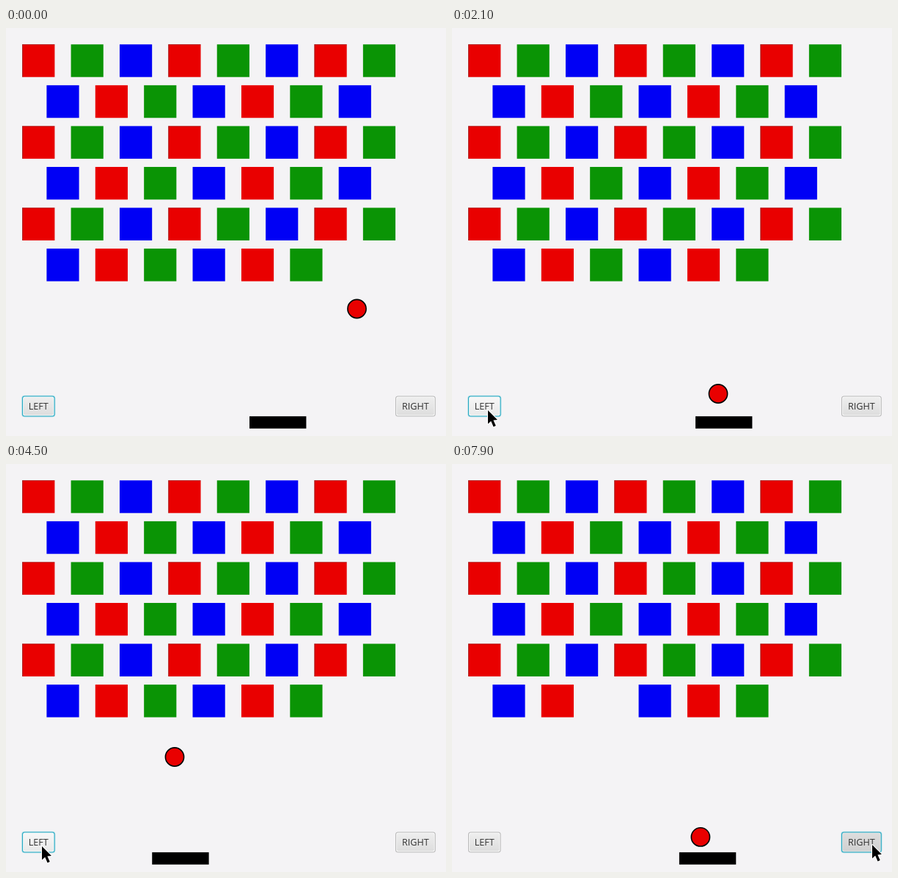
An HTML page with a canvas that plays this animation: 600x555 px, repeating every 8 s.

```html
<!DOCTYPE html>
<html lang="en">
<head>
<meta charset="utf-8">
<title>Brick game</title>
<style>
  html, body { margin: 0; width: 100%; height: 100%; overflow: hidden; background: #f4f3f5; }
  canvas { display: block; }
</style>
</head>
<body>
<canvas id="stage" width="600" height="555"></canvas>
<script>
const ctx = document.getElementById('stage').getContext('2d');
const LOOP = 8000, TICK = 100;
const COLORS = ['#e90000', '#0a9405', '#0000f5'];

// Distance travelled by the ball, and the two bounces along its way
const TRAVEL = [[0, 0], [1400, 76], [2800, 155], [4500, 248.5], [5700, 315.8], [6900, 382.5], [7900, 438.4]];
const START = { x: 478.5, y: 382 };
const PADDLE_HIT = 132.5, BRICK_HIT = 289;

const LEFT_CLICKS = [2600, 2900, 3200, 3500, 3800, 4100];
const RIGHT_CLICKS = [7050, 7230, 7410, 7590, 7770, 7950];
const PADDLE_STEP = 22.13;

// time, x, y of the pointer tip
const POINTER = [
  [1000, 108, 502], [1400, 82, 510], [1900, 49, 520], [5750, 49, 520],
  [6250, 130, 555], [6400, 470, 555], [6650, 583, 522], [6800, 573, 518], [8000, 573, 518]
];

function track(keys, t, col = 1) {
  if (t <= keys[0][0]) return keys[0][col];
  for (let i = 1; i < keys.length; i++) {
    const a = keys[i - 1], b = keys[i];
    if (t <= b[0]) return a[col] + (b[col] - a[col]) * (t - a[0]) / (b[0] - a[0]);
  }
  return keys[keys.length - 1][col];
}

const clicksBy = (list, t) => list.filter(c => c <= t).length;
const isDown = (list, t) => list.some(c => t >= c - 130 && t < c);

function drawBricks(hit) {
  let n = 0;
  for (let row = 0; row < 6; row++) {
    const odd = row % 2;
    for (let col = 0; col < 8 - odd; col++, n++) {
      if (row === 5 && (col === 6 || (col === 2 && hit))) continue;
      const x = 22.2 + odd * 33.2 + col * 66.38, y = 22.3 + row * 55.56;
      ctx.fillStyle = COLORS[n % 3];
      ctx.fillRect(x, y, 44.2, 44.4);
      if (!odd && n % 3 === 0) {
        ctx.fillStyle = 'rgba(60,0,0,.4)';
        ctx.fillRect(x, y, 1, 44.4);
        ctx.fillRect(x, y, 44.2, 0.8);
      }
    }
  }
}

function drawBall(d) {
  const x = d < BRICK_HIT ? START.x - d : START.x - 2 * BRICK_HIT + d;
  let y = START.y + d;
  if (d > PADDLE_HIT) y = START.y + 2 * PADDLE_HIT - d;
  if (d > BRICK_HIT) y = START.y + 2 * PADDLE_HIT - 2 * BRICK_HIT + d;
  ctx.beginPath();
  ctx.arc(x, y, 12.6, 0, Math.PI * 2);
  ctx.fillStyle = '#e90000';
  ctx.fill();
  ctx.lineWidth = 1.6;
  ctx.strokeStyle = '#000';
  ctx.stroke();
}

function box(x, y, w, h, r, fill) {
  ctx.beginPath();
  ctx.roundRect(x, y, w, h, r);
  ctx.fillStyle = fill;
  ctx.fill();
}

function drawButton(label, x, w, { focus, hover, down }) {
  const y = 500.5, h = 28;
  const [top, bottom] = down ? ['#dedede', '#cfcfcf'] : hover ? ['#f8f8f8', '#e8e8e8'] : ['#efefef', '#dcdcdc'];
  const fill = ctx.createLinearGradient(0, y, 0, y + h);
  fill.addColorStop(0, top);
  fill.addColorStop(1, bottom);
  if (focus) {
    box(x - 0.7, y - 0.7, w + 1.4, h + 1.4, 4, '#a9dce6');
    box(x, y, w, h, 3.5, '#2aa9c2');
  } else {
    box(x, y, w, h, 3.5, '#b8b8b8');
  }
  box(x + 1.1, y + 1.1, w - 2.2, h - 2.2, 2.5, down ? '#e6e6e6' : '#fbfbfb');
  box(x + 2, y + 2, w - 4, h - 4, 2, fill);
  ctx.fillStyle = '#333';
  ctx.font = '12.6px "Open Sans", "Noto Sans", sans-serif';
  ctx.textAlign = 'center';
  ctx.fillText(label, x + w / 2, 519.2);
}

function drawPointer(x, y) {
  const shape = [[0, 0], [0, 18.5], [4.2, 14.8], [7.6, 22.4], [10.8, 21], [7.4, 13.6], [13, 13]];
  ctx.beginPath();
  shape.forEach(([dx, dy]) => ctx.lineTo(x + dx, y + dy));
  ctx.closePath();
  ctx.lineJoin = 'round';
  ctx.lineWidth = 2;
  ctx.strokeStyle = '#fff';
  ctx.stroke();
  ctx.fillStyle = '#000';
  ctx.fill();
}

function draw(t) {
  const d = track(TRAVEL, t);
  const px = track(POINTER, t, 1), py = track(POINTER, t, 2);
  const over = (x, w) => t >= 1000 && px >= x && px <= x + w && py >= 500 && py <= 529;
  const moves = clicksBy(RIGHT_CLICKS, t) - clicksBy(LEFT_CLICKS, t);
  const rightFocus = t >= RIGHT_CLICKS[0] - 130;

  ctx.fillStyle = '#f4f3f5';
  ctx.fillRect(0, 0, 600, 555);
  drawBricks(d >= BRICK_HIT);
  ctx.fillStyle = '#000';
  ctx.fillRect(332 + moves * PADDLE_STEP, 528.2, 77.4, 16.6);
  drawButton('LEFT', 22, 44.6, { focus: !rightFocus, hover: over(22, 45), down: isDown(LEFT_CLICKS, t) });
  drawButton('RIGHT', 531, 54.8, { focus: rightFocus, hover: over(531, 55), down: isDown(RIGHT_CLICKS, t) });
  drawBall(d);
  if (t >= 1000) drawPointer(px, py);
}

const begin = performance.now();
function loop() {
  const t = Math.max(0, performance.now() - begin) % LOOP;
  draw(Math.floor(t / TICK) * TICK);
  requestAnimationFrame(loop);
}
loop();
</script>
</body>
</html>
```
